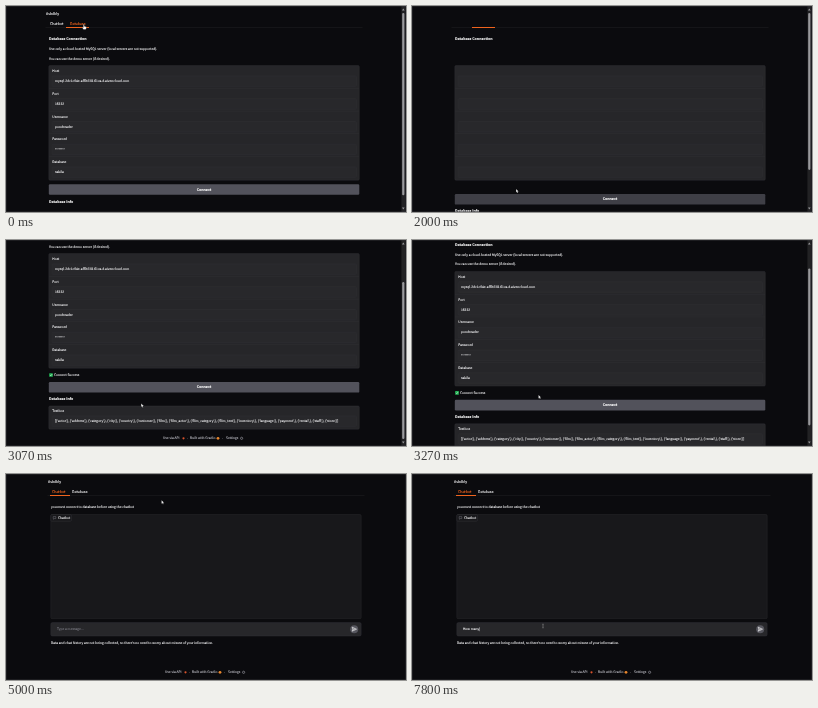
An HTML page that plays this animation: 400 by 206 pixels, repeating every 8 s.

```html
<!DOCTYPE html>
<html lang="en">
<head>
<meta charset="utf-8">
<title>Database chat demo</title>
<style>
html, body { margin: 0; width: 100%; height: 100%; overflow: hidden; background: #0b0b0e; }
svg { display: block; width: 400px; height: 206px; }
text {
  font: 3.25px "Noto Sans CJK SC", "Noto Sans CJK JP", "Noto Sans CJK", "Open Sans", sans-serif;
  color: #f0f0f2; fill: currentColor; stroke: currentColor; stroke-width: .12px;
  text-rendering: geometricPrecision; white-space: pre;
}
.bold { font-weight: 700; font-size: 3.6px; color: #fff; }
.tab { font-size: 3.55px; }
.dots { font-family: "Open Sans", sans-serif; }
.on { color: #f0641e; }
.dim { color: #75757d; }
.foot { color: #b4b4bb; }
</style>
</head>
<body>
<svg id="stage" viewBox="0 0 400 206"></svg>
<script>
const LOOP = 8000;
const TABLES = ('actor address category city country customer film film_actor film_category ' +
  'film_text inventory language payment rental staff store').split(' ');
const FIELDS = [
  ['Host', 'mysql-2dc1c04e-aff0t378-61ca.d.aivencloud.com'],
  ['Port', '16332'],
  ['Username', 'pondreader'],
  ['Password', '••••••••'],
  ['Database', 'sakila']
];
const TYPED = 'How many';
const KEY_TIMES = [7070, 7130, 7270, 7330, 7470, 7600, 7700, 7800];

// y is the middle of the line
const text = (x, y, s, cls = '', extra = '') =>
  `<text x="${x}" y="${y + 1.15}" class="${cls}" ${extra}>${s}</text>`;
const rect = (x, y, w, h, fill, r = 0, extra = '') =>
  `<rect x="${x}" y="${y}" width="${w}" height="${h}" rx="${r}" fill="${fill}" ${extra}/>`;
const dot = (x, y, r, fill) => `<circle cx="${x}" cy="${y}" r="${r}" fill="${fill}"/>`;
const group = (id, body) => `<g id="${id}">${body}</g>`;
const edge = color => `stroke="${color}" stroke-width=".4"`;

const header = (x, active) =>
  rect(x, 21.6, 317, .35, '#29292d') +
  rect(x + (active ? 20.5 : 2.5), 21, active ? 23 : 20, 1, '#f0641e') +
  `<g class="light">${text(x + .5, 8, 'Askdbly', 'tab')}
  ${text(x + 4.5, 18, 'Chatbot', active ? 'tab' : 'tab on')}
  ${text(x + 24.5, 18, 'Database', active ? 'tab on' : 'tab')}</g>`;

const footer = (x, y) =>
  text(x, y, 'Use via API', 'foot') + dot(x + 20.5, y, 1.1, '#d9532c') +
  dot(x + 24.3, y, .35, '#85858c') +
  text(x + 27, y, 'Built with Gradio', 'foot') + dot(x + 55, y, 1.4, '#e8862c') +
  dot(x + 59.5, y, .35, '#85858c') +
  text(x + 63, y, 'Settings', 'foot') +
  `<circle cx="${x + 78.6}" cy="${y}" r="1.1" fill="none" stroke="#85858c" stroke-width=".8"/>`;

const field = ([label, value], i) => {
  const y = 65 + i * 22.75;
  return rect(46, y + 5, 304.5, 10.4, '#28282b', 1, edge('#313135')) +
    (i ? rect(43, y - 5.6, 310, .4, '#303034') : '') +
    `<g class="light">${text(46.3, y, label)}${text(49, y + 10, value, i === 3 ? 'dots' : '')}</g>`;
};

const databasePage =
  header(39.5, true) +
  text(43, 33, 'Database Connection', 'bold') +
  `<g class="light">${text(43, 43, 'Use only a cloud-hosted MySQL server (local servers are not supported).')}
  ${text(43, 52.5, 'You can use the demo server (if desired).')}</g>` +
  rect(42.8, 59.6, 310.5, 114.6, '#262629', 1.2, edge('#333338')) +
  FIELDS.map(field).join('') +
  group('status',
    rect(43.2, 179.2, 3.6, 3.6, '#22b455', .5) +
    '<path d="M44 181l.8.8 1.4-1.7" fill="none" stroke="#fff" stroke-width=".5"/>' +
    text(48, 181, 'Connect Success')) +
  group('lower',
    rect(42.8, 188, 310.5, 10.6, '#52525b', 1.2, 'id="connect"') +
    text(198, 193.3, 'Connect', 'bold', 'text-anchor="middle"') +
    text(43, 205.2, 'Database Info', 'bold') +
    group('result',
      rect(42.8, 212, 310.5, 23.2, '#262629', 1.2, edge('#333338')) +
      rect(46, 222, 304.5, 10.4, '#28282b', 1, edge('#313135')) +
      text(46.3, 217, 'Textbox') +
      text(49, 227, '[' + TABLES.map(t => `('${t}',)`).join(', ') + ']') +
      footer(157, 244.3)));

const scrollbar =
  rect(395.4, 0, 3.8, 206, '#222224') +
  rect(396.2, 7, 2.2, 157, '#9a9a9d', 1.1, 'id="thumb"') +
  '<path d="M396 4.4l1.3-2 1.3 2zM396 201.6l1.3 2 1.3-2z" fill="#9a9a9d"/>';

const chatPage =
  header(41.5, false) +
  text(45, 33, 'you must connect to database before using the chatbot') +
  rect(44.8, 40.6, 310.4, 104, '#18181b', 1.2, edge('#303034')) +
  rect(44.8, 40.6, 20.6, 6.6, '#18181b', 1, edge('#3a3a40')) +
  `<path d="M47.2 42.6h2.6v2h-1.4l-.8.7v-.7h-.4z" fill="none" ${edge('#8a8a92')}/>` +
  text(52, 44, 'Chatbot') +
  rect(44.8, 148.6, 310.4, 13.4, '#27272a', 1.5, edge('#34343a')) +
  text(51, 155.2, 'Type a message...', 'dim', 'id="hint"') +
  text(51, 155.2, '', '', 'id="typed"') +
  rect(51, 153.2, .4, 4, '#e6e6e8', 0, 'id="caret"') +
  dot(348.2, 155.2, 4, '#56565e') +
  '<path d="M346.2 153.2l4.3 2-4.3 2 .7-2zM346.9 155.2h2" fill="none" stroke="#fff" stroke-width=".6"/>' +
  text(45, 169, "Data and chat history are not being collected, so there's no need to worry about misuse of your information.") +
  footer(159, 198.3);

const pointers =
  '<path id="arrow" d="M0 0v3.5l.8-.7.6 1.3.7-.3-.6-1.3h1.1z" fill="#fff" stroke="#111" stroke-width=".2"/>' +
  '<path id="hand" d="M-.5 0q.5-.6 1 0v1.7l2 .5v1.7l-.6 1.2h-2.2l-1.4-2 .5-.4.7.5z" fill="#fff" stroke="#111" stroke-width=".25"/>' +
  '<path id="beam" d="M-.6-1.8h1.2M0-1.8v3.6M-.6 1.8h1.2" fill="none" stroke="#bbb" stroke-width=".4"/>';

const $ = id => document.getElementById(id);
$('stage').innerHTML =
  rect(0, 0, 400, 206, '#0b0b0e') +
  group('data', group('scroll', databasePage) + scrollbar) +
  group('chat', chatPage) +
  rect(.2, .2, 399.6, 205.6, 'none', 0, edge('#39393c')) +
  group('cursor', pointers);

const lights = document.querySelectorAll('.light');
const show = (el, on) => { el.style.display = on ? '' : 'none'; };

// Each key is [time, value, value...]
function track(keys, t) {
  const i = keys.findIndex(k => k[0] > t);
  if (i === 0) return keys[0].slice(1);
  if (i < 0) return keys[keys.length - 1].slice(1);
  const a = keys[i - 1], b = keys[i];
  const p = (t - a[0]) / (b[0] - a[0]);
  return a.slice(1).map((v, j) => v + (b[j + 1] - v) * p);
}

const CURSOR = [
  [70, 77.8, 18.5], [400, 104, 100], [730, 104, 183], [2000, 104, 183], [2200, 117, 180],
  [2470, 117, 180], [2850, 150, 178], [3200, 126.5, 155], [3330, 126.5, 155],
  [3800, 68.5, 31.5], [4130, 50, 18], [4530, 50, 18], [5000, 155.3, 26],
  [5170, 190, 48], [5330, 169, 73], [5400, 169, 73], [6130, 131, 152]
];
const SCROLL = [
  [2070, 0], [2200, 46], [3180, 46], [3270, 28.3], [3330, 20], [3530, 0]
];

function draw(t) {
  const connected = t >= 1600, chatting = t >= 4270;
  const [x, y] = track(CURSOR, t), [scroll] = track(SCROLL, t);
  const blank = t >= 1930 && t < 2130;
  const pageHeight = connected ? 252 : 217;

  show($('data'), !chatting);
  show($('chat'), chatting);
  lights.forEach(el => show(el, !blank));
  show($('status'), t >= 2130);
  show($('result'), connected);
  $('scroll').setAttribute('transform', `translate(0 ${-scroll})`);
  $('lower').setAttribute('transform', `translate(0 ${connected ? 0 : -9.8})`);
  $('connect').setAttribute('fill', t > 700 && t < 2070 ? '#3f3f46' : '#52525b');
  $('thumb').setAttribute('y', 7 + 192 * scroll / pageHeight);
  $('thumb').setAttribute('height', 192 * 206 / pageHeight);

  const count = KEY_TIMES.filter(k => t >= k).length;
  show($('hint'), !count);
  $('typed').textContent = TYPED.slice(0, count);
  show($('caret'), t >= 6130);
  $('caret').setAttribute('x', 51.1 + (count ? $('typed').getComputedTextLength() : 0));

  const beam = t >= 6060;
  const hand = t < 140 || (t >= 700 && t < 1600) || (t >= 4080 && t < 4560);
  show($('beam'), beam);
  show($('hand'), hand);
  show($('arrow'), !beam && !hand);
  $('cursor').setAttribute('transform', `translate(${x} ${y})`);
}

const start = performance.now();
function tick() {
  draw((performance.now() - start) % LOOP);
  requestAnimationFrame(tick);
}
tick();
</script>
</body>
</html>
```
